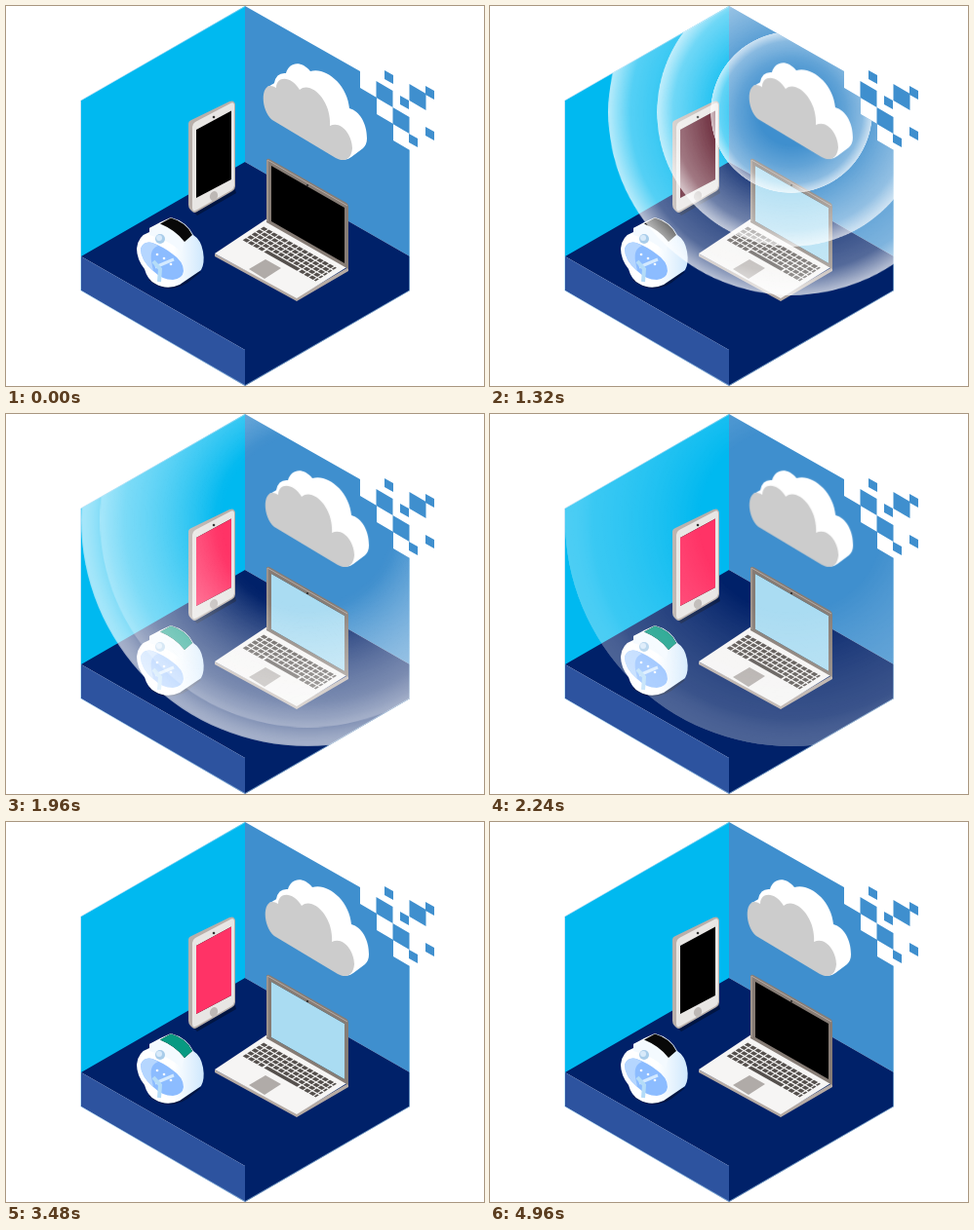
Write an HTML page without scripts that moves like this. It is 490 by 390 pixels and loops after 5000 ms.

```html
<!DOCTYPE html>
<html lang="en">
<head>
<meta charset="utf-8">
<title>Cloud sync</title>
<style>
  html, body { margin: 0; width: 100%; height: 100%; overflow: hidden; background: #fff; }
  svg { display: block; width: 490px; height: 390px; }

  .cloud { animation: drift 5s linear infinite; }
  .signal { animation: strength 5s linear infinite; }
  .ring { animation: grow 5s infinite; animation-delay: calc(-4.775s + var(--n) * .24s); }
  .light { animation: glow 5s linear infinite; animation-delay: calc(-5s + var(--n) * .38s); }

  @keyframes drift {
    0%, 100% { transform: translate(0, 0); }
    20% { transform: translate(1.8px, -.8px); }
    45% { transform: translate(2.2px, -1.2px); }
    70% { transform: translate(2px, 0); }
  }
  @keyframes grow {
    0% { transform: scale(0); animation-timing-function: cubic-bezier(.36, .03, .636, 1); }
    31%, 60% { transform: scale(1); }
    60.01%, 100% { transform: scale(0); }
  }
  @keyframes strength {
    0%, 20% { opacity: .72; }
    31%, 34.5% { opacity: 1; }
    44.8% { opacity: .3; }
    57%, 100% { opacity: 0; }
  }
  @keyframes glow {
    0%, 16% { opacity: 0; }
    24%, 74% { opacity: 1; }
    82%, 100% { opacity: 0; }
  }
</style>
</head>
<body>
<svg viewBox="0 0 490 390">
  <defs>
    <radialGradient id="wave">
      <stop offset=".4" stop-color="#fff" stop-opacity="0"/>
      <stop offset=".88" stop-color="#fff" stop-opacity=".38"/>
      <stop offset="1" stop-color="#fff" stop-opacity=".82"/>
    </radialGradient>
    <linearGradient id="strap">
      <stop offset=".55" stop-color="#fff"/>
      <stop offset="1" stop-color="#cfe8fd"/>
    </linearGradient>
    <path id="wall" d="M245 0 363 67V84L380 94V111L397 121V138L414 148V257L245 160Z"/>
    <path id="tile" d="M0 0 17 10V27L0 17Z"/>
    <path id="bit" d="M0 0 9 5V14L0 9Z"/>
    <path id="phoneScreen" d="M195 127 231 107.500V178L195 197Z"/>
    <path id="laptopScreen" d="M272 164 347 207V264L272 221Z"/>
    <path id="watchScreen" d="M158 223.500 169 217.500Q185 222 191 235L183 242Q174 230 158 223.500Z"/>
    <clipPath id="room">
      <use href="#wall"/>
      <path d="M77 97 245 0V160L414 257V292L245 390 77 292Z"/>
    </clipPath>
  </defs>

  <!-- room -->
  <path fill="#00b9f0" d="M77 97 245 0V161L77 258Z"/>
  <g fill="#3f8fce">
    <use href="#wall"/>
    <use href="#tile" x="379.500" y="77"/>
    <use href="#tile" x="396.500" y="104"/>
    <use href="#tile" x="413.500" y="80"/>
    <use href="#bit" x="388" y="66"/>
    <use href="#bit" x="404" y="92"/>
    <use href="#bit" x="430" y="82"/>
    <use href="#bit" x="413" y="131"/>
    <use href="#bit" x="430" y="124"/>
  </g>
  <path fill="#002169" d="M245 160 414 257V292L245 390V353L77 257Z"/>
  <path fill="#2d539f" d="M77 257 245 353V390L77 292Z"/>
  <path fill="none" stroke="#a8d8f2" stroke-opacity=".6" d="M413.500 148V292L245 389.500 76.500 292V97L245 .5"/>

  <!-- phone -->
  <path fill="#001543" d="M190 209 196 215 236 192 234 185Z"/>
  <path fill="#b8afaa" d="M187 121Q187 118 190 117L229 98Q234 96 235 101V185Q235 188 232 190L196 211Q193 213 191 211L189 209Q187 207 187 204Z"/>
  <path fill="#e8e6e4" d="M191 124Q191 121 194 119L230 100Q234 98 234 102V184Q234 187 231 189L196 209Q191 212 191 207Z"/>
  <use href="#phoneScreen"/>
  <use href="#phoneScreen" class="light" style="--n:1" fill="#ff3366"/>
  <ellipse cx="213" cy="195" rx="4" ry="5" fill="#bdb8b5" transform="rotate(20 213 195)"/>
  <circle cx="213" cy="114" r="1.300" fill="#333"/>

  <!-- laptop -->
  <path fill="#b5aaa3" d="M214 254V257L298 303 351 272V268L298 299Z"/>
  <path fill="#f6f5f4" d="M268 218 351 267 298 300 214 254Z"/>
  <path fill="#867c75" d="M267 158Q268 156 270 157L349 202Q351 203 351 206V270L267 222Z"/>
  <path fill="none" stroke="#b5aaa3" d="M268 221V158L350 205"/>
  <use href="#laptopScreen"/>
  <use href="#laptopScreen" class="light" style="--n:0" fill="#aadcf2"/>
  <circle cx="309" cy="184" r="1" fill="#222"/>
  <g transform="matrix(.87 .49 -.84 .54 265 226)" stroke="#55504d" stroke-width="4" stroke-dasharray="4.800 1.200">
    <path d="M0 3H86M0 8.400H86M0 13.800H86M0 19.200H86"/>
    <path d="M0 24.600H24M66 24.600H86"/>
    <path d="M25 24.600H64" stroke-dasharray="none"/>
  </g>
  <path fill="#b0aba8" d="M266 260 282 269 265 280 249 270Z"/>

  <!-- watch -->
  <path fill="#001543" d="M146 281Q165 297 186 284L200 273 180 270Z"/>
  <path fill="url(#strap)" d="M147 228 158 222 169 217Q185 221 192 235 200 240 202 252 204 264 200 271L178 286Q165 292 153 285 145 281 142 270 134 260 134 249 135 236 147 232Z"/>
  <path fill="#8cbcff" d="M138 249Q141 241 150 243 161 247 170 254 182 262 182 272 181 280 171 281 160 281 151 272 138 261 138 249Z"/>
  <path fill="#b5d6ff" d="M138 249Q141 241 150 243L156 246Q147 249 149 262L151 272Q138 261 138 249Z"/>
  <path fill="none" stroke="#d4eaff" stroke-width="3" d="M153 268 172 260"/>
  <path fill="none" stroke="#b4dcf8" stroke-width="4" d="M151 262 158 270 157 283"/>
  <g fill="#fff"><circle cx="155" cy="255" r="1.300"/><circle cx="162" cy="259" r="1.300"/><circle cx="169" cy="265" r="1.300"/></g>
  <path fill="#f4faff" d="M147 228 158 223Q175 230 183 242L180 252Q166 240 147 235Z"/>
  <circle cx="158" cy="239" r="5" fill="#a9cdea"/>
  <circle cx="157" cy="238" r="3" fill="#d8eafa"/>
  <use href="#watchScreen" fill="#080808"/>
  <use href="#watchScreen" class="light" style="--n:2" fill="#079a82"/>

  <g clip-path="url(#room)">
    <g class="signal">
      <g transform="translate(309 109)" fill="url(#wave)">
        <circle class="ring" style="--n:0" r="232"/>
        <circle class="ring" style="--n:1" r="232"/>
        <circle class="ring" style="--n:2" r="232"/>
      </g>
    </g>
  </g>

  <g class="cloud">
    <path fill="#fff" d="M268 83Q274 80 275 79 277 68 287 69C290 58 302 55 312 67 327 62 350 80 352 105 363 108 370 121 370 136Q370 142 366 146L354 155Q348 160 340 156L300 110Z"/>
    <path fill="#ccc" d="M273 117C261 107 261 82 271 82Q274 82 277 84C277 72 292 71 301 86 312 76 334 97 332 123 344 117 355 133 355 146 354 159 345 160 338 156Z"/>
  </g>
</svg>
</body>
</html>
```
